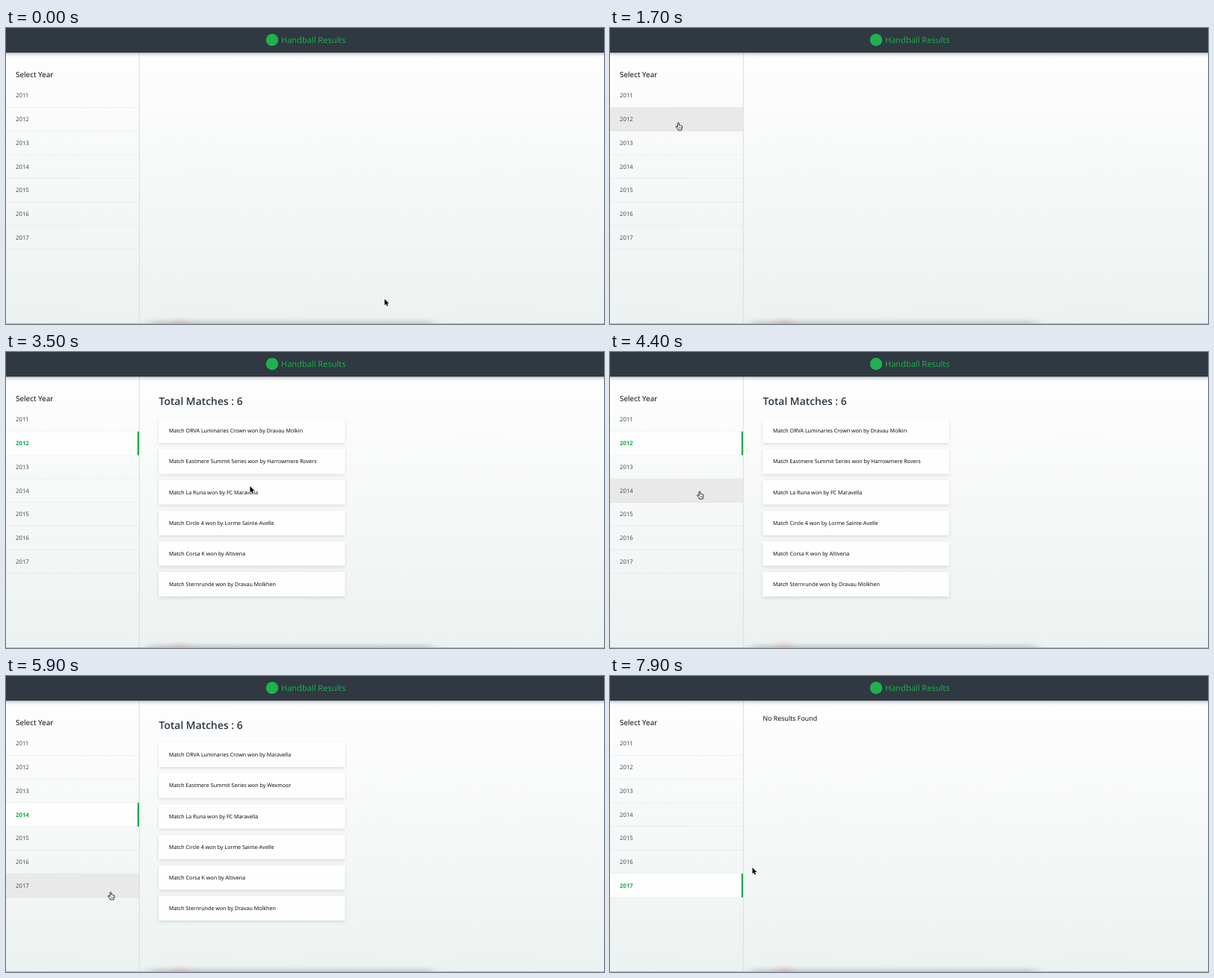
Recreate the animation shown at these times as an HTML page. Size 800x397 px, loop 8000 ms.

```html
<!DOCTYPE html>
<html lang="en">
<head>
<meta charset="utf-8">
<title>Handball Results</title>
<style>
html, body { margin: 0; width: 100%; height: 100%; overflow: hidden; background: #fff; }
svg { display: block; width: 800px; height: 397px; font-family: "Open Sans", sans-serif; text-rendering: geometricPrecision; cursor: default; }
</style>
</head>
<body>
<svg id="stage" viewBox="0 0 800 397" xmlns="http://www.w3.org/2000/svg">
  <defs>
    <linearGradient id="page" x2="0" y2="1">
      <stop offset="0" stop-color="#fefefe"/>
      <stop offset=".15" stop-color="#fdfdfd"/>
      <stop offset="1" stop-color="#ecf2f1"/>
    </linearGradient>
    <linearGradient id="under" x2="0" y2="1">
      <stop offset="0" stop-color="#303842" stop-opacity=".36"/>
      <stop offset=".4" stop-color="#303842" stop-opacity=".12"/>
      <stop offset="1" stop-color="#303842" stop-opacity="0"/>
    </linearGradient>
    <filter id="soft" x="-10%" y="-30%" width="120%" height="170%">
      <feDropShadow dx="0" dy="1.6" stdDeviation="2.2" flood-color="#000" flood-opacity=".13"/>
    </filter>
    <filter id="blur" x="-20%" y="-300%" width="140%" height="700%">
      <feGaussianBlur stdDeviation="8 3.2"/>
    </filter>
  </defs>
  <rect width="800" height="397" fill="url(#page)"/>
  <g filter="url(#blur)">
    <rect x="190" y="394" width="380" height="10" fill="#70787a" opacity=".42"/>
    <ellipse cx="233" cy="396" rx="10" ry="5" fill="#d86a5c" opacity=".3"/>
  </g>
  <rect y="396" width="800" height="1" fill="#b9bcbd"/>
  <g id="rows"></g>
  <rect x="177.8" y="33" width="1" height="363" fill="#d9dde0"/>
  <rect id="bar" x="175.8" width="2.2" height="31.7" fill="#1ba94c"/>
  <text x="13" y="65.6" font-size="9.98">Select Year</text>
  <g id="content"></g>
  <rect y="33" width="800" height="6" fill="url(#under)"/>
  <rect width="800" height="33" fill="#303842"/>
  <circle cx="356" cy="16" r="8.2" fill="#1fb24c"/>
  <text x="368" y="20" font-size="11.09" fill="#1fb24c">Handball Results</text>
  <g id="arrow">
    <path d="M0 0V8.2L1.9 6.5L3.1 9.4L4.6 8.8L3.3 5.9H5.9Z" fill="#000" stroke="#fff" stroke-width=".9" paint-order="stroke"/>
  </g>
  <g id="hand">
    <path d="M-.9 6V.8Q-.9 0 0 0T.9 .8V3.6Q1.6 2.9 2.3 3.7Q3.1 3.1 3.7 4Q4.8 3.6 5 4.8V6.9Q4.8 8 4.2 8.7V10H-.7V8.8Q-1.8 7.6-3.3 5.5Q-3.5 4.3-2.3 4.7Z" fill="#fff" stroke="#111" stroke-width=".9" stroke-linejoin="round"/>
    <path d="M.8 6.2V8M2.1 6.2V8M3.4 6.2V8" stroke="#111" stroke-width=".55"/>
  </g>
</svg>
<script>
const LOOP = 8000, STEP = 100, TOP = 75, ROW = 31.7, SIDE = 178, GREEN = '#1ba94c';
const $ = id => document.getElementById(id);

function add(parent, tag, attrs, text) {
  const el = document.createElementNS('http://www.w3.org/2000/svg', tag);
  for (const k in attrs) el.setAttribute(k, attrs[k]);
  if (text) el.textContent = text;
  return parent.appendChild(el);
}

// Sidebar
const rows = Array.from({ length: 7 }, (_, i) => {
  const y = TOP + i * ROW;
  const bg = add($('rows'), 'rect', { y, width: SIDE, height: ROW });
  add($('rows'), 'rect', { y: y + ROW - .7, width: SIDE, height: 1, fill: '#000', opacity: .045 });
  const label = add($('rows'), 'text', { x: 13, y: y + 18.4, 'font-size': 7.8 }, String(2011 + i));
  return { bg, label };
});

// Result lists
const shared = ['La Runa won by FC Maravella', 'Circle 4 won by Lorme Sainte-Avelle',
  'Corsa K won by Altivena', 'Sternrunde won by Dravau Molkhen'];

function results(first, second) {
  const g = add($('content'), 'g', {});
  const list = [`ORVA Luminaries Crown won by ${first}`, `Eastmere Summit Series won by ${second}`, ...shared];
  add(g, 'text', { x: 204.5, y: 71, 'font-size': 13.9, 'font-weight': 600, fill: '#2c3540' }, `Total Matches : ${list.length}`);
  const moving = add(g, 'g', {});
  list.forEach((line, i) => {
    const y = 89.6 + i * 41.15;
    add(moving, 'rect', { x: 204.5, y, width: 248.8, height: 32.4, rx: .8, fill: '#fefefe', filter: 'url(#soft)' });
    add(moving, 'text', { x: 218, y: y + 18.7, 'font-size': 7.15 }, 'Match ' + line);
  });
  return { g, moving };
}

function empty() {
  const g = add($('content'), 'g', {});
  const moving = add(g, 'g', {});
  add(moving, 'text', { x: 204.5, y: 60, 'font-size': 8.87 }, 'No Results Found');
  return { g, moving };
}

// Each pick: row, click time, time its content arrives
const picks = [
  { row: 1, click: 2200, show: 2800, view: results('Dravau Molkin', 'Harrowmere Rovers') },
  { row: 3, click: 5000, show: 5270, view: results('Maravella', 'Wexmoor') },
  { row: 6, click: 6500, show: 6580, view: empty() }
];
const FADE = 400, RISE = 16;

// Pointer path: time, x, y
const path = [
  [0, 506.5, 363.5], [900, 126, 136], [1600, 91.5, 127], [2220, 91.5, 127],
  [2780, 326.5, 180], [3700, 326.5, 180], [4350, 120, 187], [5250, 120, 187],
  [5850, 140, 290], [6400, 139, 288.5], [6900, 139, 288.5], [7300, 198, 252],
  [7800, 190.5, 257], [LOOP, 190.5, 257]
];

const clamp = v => Math.max(0, Math.min(1, v));
const ease = v => v * v * (3 - 2 * v);

function pointer(t) {
  const i = path.findIndex(p => p[0] > t);
  const [t0, x0, y0] = path[i - 1], [t1, x1, y1] = path[i];
  const k = ease((t - t0) / (t1 - t0));
  return [x0 + (x1 - x0) * k, y0 + (y1 - y0) * k];
}

function draw(t) {
  const [x, y] = pointer(t);
  const over = x < SIDE ? Math.floor((y - TOP) / ROW) : -1;
  const onRow = over >= 0 && over < rows.length;
  const picked = picks.filter(p => t >= p.click).pop();
  const shown = picks.filter(p => t >= p.show).pop();
  const active = picked ? picked.row : -1;

  rows.forEach(({ bg, label }, i) => {
    const on = i === active;
    bg.setAttribute('fill', on ? '#fefefe' : i === over ? '#eae9ea' : 'none');
    label.setAttribute('fill', on ? GREEN : '#3c4043');
    label.setAttribute('font-weight', on ? 700 : 400);
  });
  $('bar').setAttribute('y', TOP + active * ROW);
  $('bar').setAttribute('display', picked ? 'inline' : 'none');

  for (const p of picks) {
    p.view.g.setAttribute('display', p === shown ? 'inline' : 'none');
    const k = ease(clamp((t - p.show) / FADE));
    p.view.moving.setAttribute('opacity', k);
    p.view.moving.setAttribute('transform', `translate(0 ${RISE * (1 - k)})`);
  }

  for (const id of ['arrow', 'hand']) {
    $(id).setAttribute('transform', `translate(${x} ${y})`);
    $(id).setAttribute('display', (id === 'hand') === onRow ? 'inline' : 'none');
  }
}

function tick(now) {
  draw(Math.floor((now % LOOP) / STEP) * STEP);
  requestAnimationFrame(tick);
}
draw(0);
requestAnimationFrame(tick);
</script>
</body>
</html>
```
